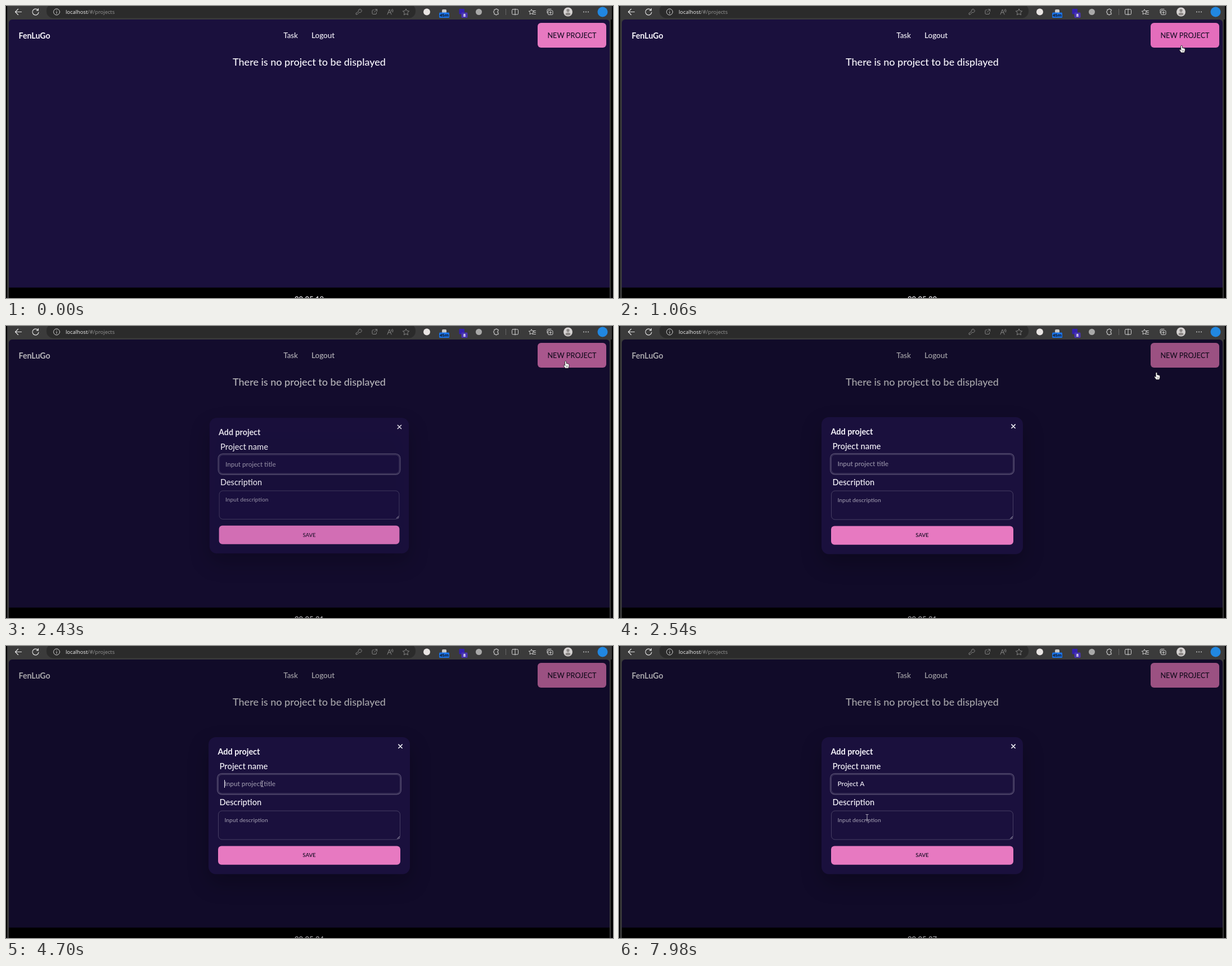
Write an HTML page with a canvas that moves like this. It is 1079 px wide and 519 px high and loops after 8000 ms.

```html
<!DOCTYPE html>
<html lang="en">
<head>
<meta charset="utf-8">
<title>Projects</title>
<style>
html, body { margin: 0; width: 100%; height: 100%; overflow: hidden; background: #000; }
canvas { display: block; }
</style>
</head>
<body>
<canvas id="stage" width="1079" height="519"></canvas>
<script>
const ctx = document.getElementById('stage').getContext('2d');
const LOOP = 8000;
const UI = 'Lato, "Open Sans", sans-serif';
const BAR = '"Open Sans", "Noto Sans", sans-serif';
const INK = '#f9f7fd', BASE = '#1a103d', DARK = '#1d1029', ICON = '#d0d0d0', DIM = '#858585';
const PINK = [231, 121, 193], HOVER = [224, 88, 178];

// Cursor path: time, x, y of the hot spot
const PATH = [
  [280, 1046, 505], [520, 1030, 388], [800, 1012, 190], [980, 1003, 82], [1060, 1000, 70],
  [1260, 1001, 61], [1790, 1000.5, 60.5], [2010, 999, 61], [2170, 999, 62],
  [2430, 995, 62], [2520, 975, 72], [2740, 770, 180], [2960, 550, 276], [3060, 512, 268],
  [3150, 465, 248], [3350, 452, 245], [3500, 454.5, 244.5], [3730, 455.5, 245],
  [7640, 455.5, 245], [7780, 450, 268], [7980, 441, 304.5]
];
const KEYS = [5040, 5360, 5560, 5730, 6140, 6220, 6420, 6670, 6980];
const TICKS = [300, 760, 1200, 2700, 3730, 4700, 5830, 6760, 7700];
const TYPED = 'Project A';

const clamp = v => Math.max(0, Math.min(1, v));
const smooth = (t, from, ms) => { const u = clamp((t - from) / ms); return u * u * (3 - 2 * u); };
const count = (list, t) => list.filter(v => v <= t).length;
const rgb = c => `rgb(${c.map(Math.round)})`;
const mix = (a, b, p) => a.map((v, i) => v + (b[i] - v) * p);

function text(str, x, mid, size, color, { weight = 500, align = 'left', font = UI } = {}) {
  ctx.font = `${weight} ${size}px ${font}`;
  ctx.textAlign = align;
  ctx.fillStyle = color;
  ctx.fillText(str, x, mid + size * 0.36);
  return ctx.measureText(str).width;
}

function box(x, y, w, h, r, fill, stroke, width = 1) {
  ctx.beginPath();
  ctx.roundRect(x, y, w, h, r);
  if (fill) { ctx.fillStyle = fill; ctx.fill(); }
  if (stroke) { ctx.strokeStyle = stroke; ctx.lineWidth = width; ctx.stroke(); }
}

function disc(x, y, r, fill) {
  ctx.beginPath();
  ctx.arc(x, y, r, 0, 7);
  ctx.fillStyle = fill;
  ctx.fill();
}

function draw(d, x, y, stroke, width = 1, fill) {
  const p = new Path2D(d);
  ctx.save();
  ctx.translate(x, y);
  ctx.lineWidth = width;
  ctx.lineJoin = ctx.lineCap = 'round';
  if (fill) { ctx.fillStyle = fill; ctx.fill(p); }
  if (stroke) { ctx.strokeStyle = stroke; ctx.stroke(p); }
  ctx.restore();
}

function star(x, y, r, color) {
  ctx.beginPath();
  for (let i = 0; i < 10; i++) {
    const a = i * Math.PI / 5 - Math.PI / 2, k = i % 2 ? r * 0.48 : r;
    ctx.lineTo(x + k * Math.cos(a), y + k * Math.sin(a));
  }
  ctx.closePath();
  ctx.strokeStyle = color;
  ctx.lineWidth = 1;
  ctx.lineJoin = 'round';
  ctx.stroke();
}

function toolbar() {
  ctx.fillStyle = '#3b3b3b';
  ctx.fillRect(2, 0, 1073, 519);
  ctx.fillRect(1075, 0, 2, 24);
  box(72, -4, 656, 25.5, 12, '#2b2b2b');
  draw('M5.5 0H-5.5M-.5 -5L-5.5 0L-.5 5', 22, 10.5, '#e4e4e4', 1.2);
  draw('M4.6 -3A5.5 5.5 0 1 0 5.5 .5M4.9 -6V-2.7H1.6', 52.5, 10.5, '#e4e4e4', 1.2);
  draw('M5.5 0A5.5 5.5 0 1 1 -5.5 0A5.5 5.5 0 1 1 5.5 0M0 -.5V2.8M0 -2.7V-2.5', 90, 10.5, ICON);
  const w = text('localhost', 106, 10.6, 9.4, '#f2f2f2', { weight: 400, font: BAR });
  text('/#/projects', 106 + w, 10.6, 9.4, '#989898', { weight: 400, font: BAR });

  draw('M-.6 -.5A3 3 0 1 1 1 1.3L-2.8 5H-4.8V3ZM2.3 -2.3V-2.2', 627, 10, DIM);
  draw('M-1 -3.5H-2.5Q-4 -3.5 -4 -2V2.5Q-4 4 -2.5 4H2Q3.5 4 3.5 2.5V1M1 -4.5H4.5V-1M4.5 -4.5L-.5 .5', 655, 10.5, DIM);
  draw('M-5 4.5L-1.5 -4.5L2 4.5M-3.7 1.2H.8M2 -4Q3.6 -2.7 2.3 -.8M4 -5Q6.2 -2.5 4.3 .5', 683, 10.5, DIM);
  star(711, 11, 6, DIM);

  disc(748, 10.5, 6, '#e9e5e3');
  box(775, 6, 8, 7, 2, '#c8c8c8');
  box(770, 11.5, 18, 9.5, 1.5, '#1a73e8');
  text('45m', 779, 16.6, 7.6, '#10131c', { weight: 700, align: 'center', font: BAR });
  box(805.5, 5, 9.5, 9.5, 1, '#3320ad');
  box(809.5, 11.5, 11, 9.5, 1.5, '#4a35b5');
  text('8', 815, 16.4, 7.6, '#fff', { weight: 700, align: 'center', font: BAR });
  disc(840.5, 10.5, 5.5, '#a9a9a9');
  draw('M-3 -4H-1A1.8 1.8 0 0 1 2.4 -4H4V-1.6A1.8 1.8 0 0 0 4 1.8V4.5H2A1.8 1.8 0 0 1 -1.3 4.5H-3V2A2 2 0 0 1 -3 -1.7Z', 871, 10.3, ICON, 1.1);
  ctx.fillStyle = '#666';
  ctx.fillRect(888, 5, 1, 11);
  draw('M-4 -4.5H4Q5.5 -4.5 5.5 -3V3Q5.5 4.5 4 4.5H-4Q-5.5 4.5 -5.5 3V-3Q-5.5 -4.5 -4 -4.5ZM0 -5.5V5.5', 905, 10.5, ICON);
  star(934, 10.8, 5, ICON);
  draw('M1.5 -2H6M2.5 1H6M2.5 4H6', 935.5, 10.5, ICON);
  draw('M-2 -2.5H3.5Q5 -2.5 5 -1V3.5Q5 5 3.5 5H-2Q-3.5 5 -3.5 3.5V-1Q-3.5 -2.5 -2 -2.5ZM.8 -.7V3.3M-1.2 1.3H2.8M-5 2V-3Q-5 -5 -3 -5H2', 967, 10.5, ICON);
  disc(999, 10.5, 8, '#d6d3d2');
  disc(999, 8, 2.7, '#8c8886');
  draw('M-4.6 4.7Q-4.6 1.3 0 1.3Q4.6 1.3 4.6 4.7Q0 8 -4.6 4.7Z', 999, 10.5, null, 1, '#8c8886');
  for (const x of [1027, 1031, 1035]) disc(x, 10.5, 0.9, ICON);
  disc(1060.5, 10.5, 9, '#2187e0');
}

function page(t, hover, dim) {
  box(5, 24, 1068, 500, [6, 6, 0, 0], BASE);
  ctx.fillStyle = '#000';
  ctx.fillRect(5, 500.5, 1068, 18.5);
  text('FenLuGo', 22.5, 52.7, 14.2, INK, { weight: 700 });
  text('Task', 493.3, 52.5, 13.3, INK);
  text('Logout', 543, 52.5, 13.5, INK);
  box(945, 30, 122, 44, 6, rgb(mix(PINK, HOVER, hover)));
  text('NEW PROJECT', 1006, 52, 12.7, DARK, { align: 'center' });
  text('There is no project to be displayed', 539, 99.8, 18, INK, { align: 'center' });
  text('00:05:' + (18 + count(TICKS, t)), 539, 521, 13.1, INK, { align: 'center' });
  if (dim) box(5, 24, 1068, 500, [6, 6, 0, 0], `rgba(0,0,0,${0.33 * dim})`);
}

function caretOn(t) {
  if (t < 3350) return false;
  if (t < 5040) return t < 3870 || (t >= 4390 && t < 4930);
  const last = KEYS[count(KEYS, t) - 1];
  return (t - last) % 1040 < 520;
}

function modal(t, p) {
  if (!p) return;
  const scale = 0.9 + 0.1 * p;
  ctx.save();
  ctx.globalAlpha = p;
  ctx.translate(539, 283.5);
  ctx.scale(scale, scale);
  ctx.translate(-539, -283.5);

  ctx.save();
  ctx.shadowColor = 'rgba(0,0,0,.25)';
  ctx.shadowBlur = 36;
  ctx.shadowOffsetY = 16;
  box(360, 162, 358, 243.5, 13, BASE);
  ctx.restore();

  const edge = 'rgba(249,247,253,.2)', faint = '#9a95aa';
  draw('M-3.2 -3.2L3.2 3.2M3.2 -3.2L-3.2 3.2', 701, 178.3, INK, 1.5);
  text('Add project', 376.5, 188.3, 14.4, INK, { weight: 700 });
  text('Project name', 379.5, 213.6, 14.8, INK);
  box(375.7, 226.7, 326.6, 37, 8, null, 'rgba(249,247,253,.25)', 1.6);
  box(377.5, 228.5, 323, 33.5, 6.5, BASE, edge);
  const typed = TYPED.slice(0, count(KEYS, t));
  if (!typed) text('Input project title', 388.5, 245.2, 11.8, faint);
  const w = text(typed, 388.5, 245.2, 11.8, INK);
  if (caretOn(t)) ctx.fillRect(Math.round(388 + w), 238, 1, 14);
  text('Description', 379.5, 278, 14.6, INK);
  box(377.5, 293, 323, 51, 6.5, BASE, edge);
  text('Input description', 388.5, 309, 10.3, faint);
  draw('M-2 2L2 -2M.5 2L2 .5', 697.5, 340.5, '#b5b1c0', 0.9);
  box(377, 355.5, 324, 33.3, 6, rgb(PINK));
  text('SAVE', 539, 372, 9.6, DARK, { align: 'center', weight: 600 });
  ctx.restore();
}

function cursor(t) {
  if (t < 280) return;
  let i = 0;
  while (i < PATH.length - 2 && PATH[i + 1][0] <= t) i++;
  const [t0, x0, y0] = PATH[i], [t1, x1, y1] = PATH[i + 1];
  const u = clamp((t - t0) / (t1 - t0));
  const x = x0 + (x1 - x0) * u, y = y0 + (y1 - y0) * u;
  if (t < 1020) {
    draw('M0 0V12L2.8 9.4L4.6 13.4L6.4 12.6L4.6 8.7H8.4Z', x, y, '#111', 0.8, '#fff');
  } else if (t < 3350) {
    draw('M-1.3 1Q0 -.8 1.3 1V4.6Q2.3 4 3 5Q4 4.4 4.6 5.4Q6 5 6.2 6.6V9.3L5 13H-.6L-3.6 8.8Q-4 7 -2.6 7L-1.3 8.3Z', x, y, '#111', 0.8, '#fff');
    draw('M1.6 8.2V11M3.4 8.2V11', x, y, '#333', 0.6);
  } else {
    draw('M-2 -5H-.6L0 -4.5L.6 -5H2M0 -4.5V4.5M-2 5H-.6L0 4.5L.6 5H2', x, y, '#c4c0cc', 0.9);
  }
}

function frame(now) {
  const t = now % LOOP;
  const open = smooth(t, 2270, 200);
  const hover = smooth(t, 980, 200) * (1 - smooth(t, 2270, 200));
  ctx.fillStyle = '#000';
  ctx.fillRect(0, 0, 1079, 519);
  toolbar();
  page(t, hover, open * open);
  modal(t, open);
  cursor(t);
  requestAnimationFrame(frame);
}
requestAnimationFrame(frame);
</script>
</body>
</html>
```
